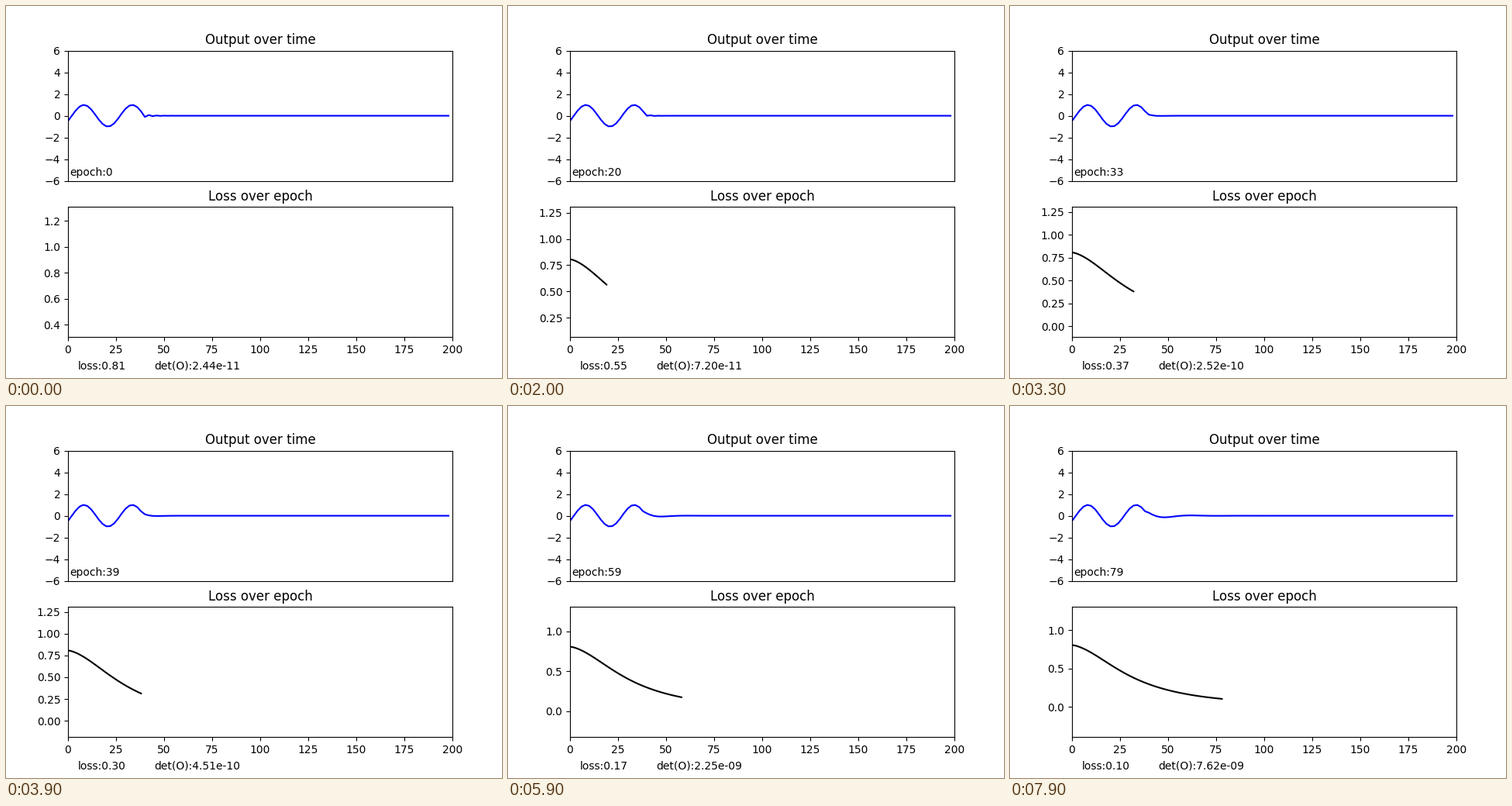
These frames come from a looping animation (640x480 px, 8 s). A matplotlib script:

```python
import matplotlib.pyplot as plt
import numpy as np
from matplotlib.animation import FuncAnimation

EPOCHS = 80
KNOTS = np.array([0, 13, 27, 39, 50, 69, 79])
DET = np.log10([2.44e-11, 4.11e-11, 1.40e-10, 4.51e-10, 1.16e-9, 4.28e-9, 7.62e-9])
SWING = np.array([0, 0.03, 0.12, 0.2, 0.29, 0.36, 0.41])
DECAY = np.array([0.3, 0.42, 0.5, 0.58, 0.66, 0.75, 0.795])
JITTER = np.array([-0.11, -0.07, -0.02, 0, 0, 0, 0])


def smooth(n, values):
    """Cubic Hermite interpolation over the training knots."""
    slopes = np.gradient(values, KNOTS, edge_order=2)
    i = min(np.searchsorted(KNOTS, n, side="right") - 1, len(KNOTS) - 2)
    h = KNOTS[i + 1] - KNOTS[i]
    t = (n - KNOTS[i]) / h
    return ((1 + 2 * t) * (1 - t) ** 2 * values[i]
            + t * (1 - t) ** 2 * h * slopes[i]
            + t * t * (3 - 2 * t) * values[i + 1]
            + t * t * (t - 1) * h * slopes[i + 1])


def loss_at(n):
    return 0.806 / (1 + 0.0064 * n**2 / (n + 1.5) + 0.00081 * n**2 + 3e-6 * n**3)


def output_at(n):
    """Driven sine for 20 steps, then the network's own decaying response."""
    driven = np.sin(0.5 * (np.arange(20) - 1))
    j = np.arange(80)
    ring = smooth(n, SWING) * smooth(n, DECAY) ** j * np.cos(0.46 * j + 0.83)
    flutter = np.interp(n, KNOTS, JITTER) * (-0.57) ** j
    return np.concatenate([driven, ring + flutter])


steps = np.arange(0, 200, 2)
epochs = np.arange(EPOCHS)
losses = loss_at(epochs)

plt.rcParams["font.family"] = "DejaVu Sans"
fig, (top, bottom) = plt.subplots(2, 1, figsize=(6.4, 4.8), dpi=100)

top.set_title("Output over time")
top.set_xlim(0, 200)
top.set_ylim(-6, 6)
top.set_xticks([])
top.set_yticks(range(-6, 7, 2))
wave, = top.plot([], [], "b-")
epoch_text = top.text(1, -5.5, "")

bottom.set_title("Loss over epoch")
bottom.set_xlim(0, 200)
curve, = bottom.plot([], [], "k-")
loss_text = fig.text(92.4 / 640, 11 / 480, "")
det_text = fig.text(191.6 / 640, 11 / 480, "")


def update(n):
    wave.set_data(steps, output_at(n))
    curve.set_data(epochs[:n], losses[:n])
    bottom.set_ylim(losses[max(n - 1, 0)] - 0.5, losses[0] + 0.5)
    epoch_text.set_text(f"epoch:{n}")
    loss_text.set_text(f"loss:{losses[n]:.2f}")
    det_text.set_text(f"det(O):{10 ** smooth(n, DET):.2e}")
    return wave, curve, epoch_text, loss_text, det_text


anim = FuncAnimation(fig, update, frames=EPOCHS, interval=100, repeat=True)
plt.show()
```
